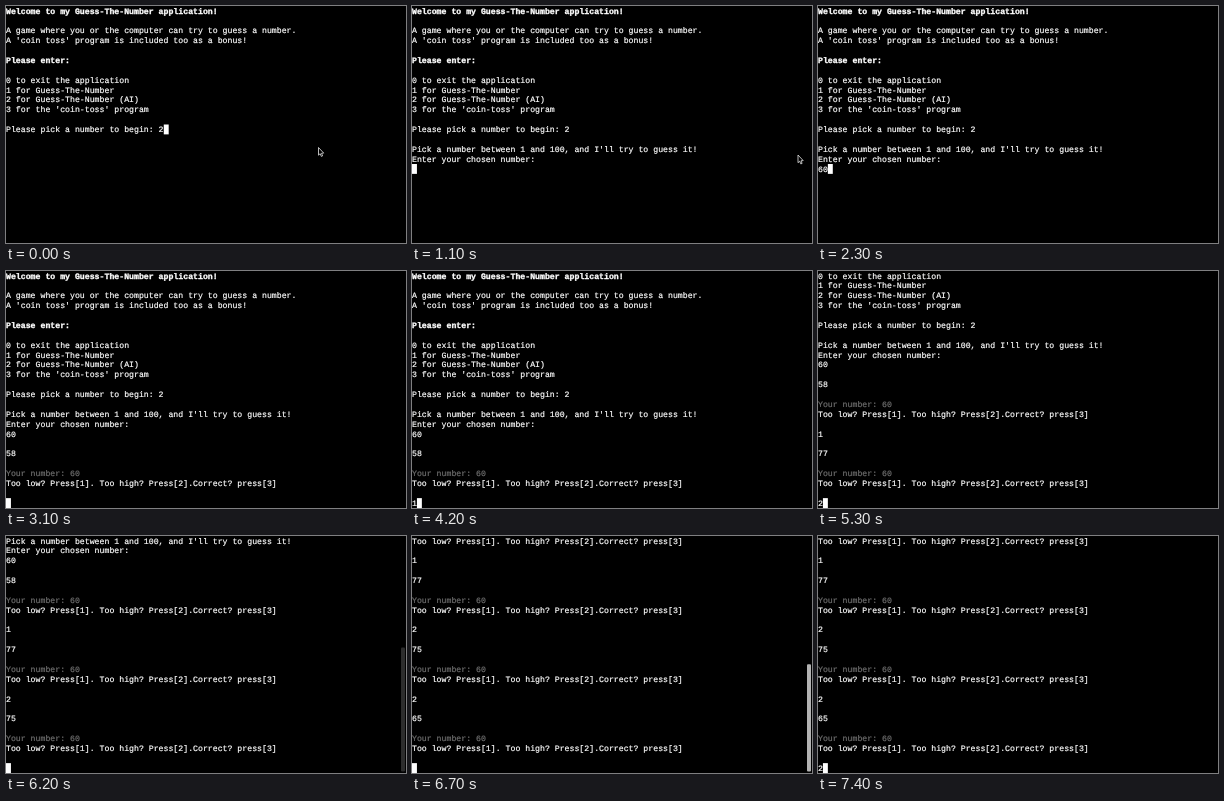
Animation of 400 by 237 pixels, one loop 8000 ms. Source, as an HTML page with a canvas:

```html
<!DOCTYPE html>
<html lang="en">
<head>
<meta charset="utf-8">
<title>Guess the number in a terminal</title>
<style>
  html, body { margin: 0; width: 100%; height: 100%; overflow: hidden; background: #000; }
  canvas { display: block; width: 400px; height: 237px; }
</style>
</head>
<body>
<canvas id="screen"></canvas>
<script>
const W = 400, H = 237, LOOP = 8000, TICK = 100;
const VISIBLE = 24, ROW = H / VISIBLE, COL = 4.93, BASELINE = 7.5;
const HISTORY = 7.5; // rows scrolled away before the session starts
const FONT = '8.215px "Liberation Mono", "Courier New", monospace';

const canvas = document.getElementById('screen');
const ctx = canvas.getContext('2d');
const dpr = window.devicePixelRatio || 1;
canvas.width = Math.round(W * dpr);
canvas.height = Math.round(H * dpr);

const clamp = v => Math.min(1, Math.max(0, v));
const mix = (a, b, p) => a + (b - a) * p;

// The session is recorded as lines plus the text cursor's place over time.
const lines = [{ text: '' }];
const moves = [];

function mark(time) {
  const row = lines.length - 1;
  moves.push({ time, row, col: lines[row].text.length });
}

function type(time, keys) {
  lines[lines.length - 1].text += keys;
  mark(time);
}

function print(time, text) {
  for (const line of text.split('\n')) {
    const [, tag, body] = line.match(/^([*~]?)(.*)$/);
    const last = lines[lines.length - 1];
    last.text += body;
    last.bold = tag === '*';
    last.dim = tag === '~';
    lines.push({ text: '' });
  }
  lines.pop();
  mark(time);
}

function playRound(guess, reply, shown, typed) {
  print(shown, `\n\n${guess}\n\n~Your number: 60\n` +
    'Too low? Press[1]. Too high? Press[2].Correct? press[3]\n\n');
  type(typed, reply);
}

print(0, `*Welcome to my Guess-The-Number application!

A game where you or the computer can try to guess a number.
A 'coin toss' program is included too as a bonus!

*Please enter:

0 to exit the application
1 for Guess-The-Number
2 for Guess-The-Number (AI)
3 for the 'coin-toss' program

Please pick a number to begin: `);
type(0, '2');
print(500, '\n');
print(600, "\nPick a number between 1 and 100, and I'll try to guess it!\n" +
  'Enter your chosen number:\n');
type(2300, '60');
playRound('58', '1', 3100, 4200);
['77', '75', '65'].forEach((guess, i) => {
  const shown = 4500 + 1100 * i;
  playRound(guess, '2', shown, shown + 700);
});

function drawLine({ bold, dim }, text, y) {
  ctx.font = (bold ? 'bold ' : '') + FONT;
  ctx.fillStyle = ctx.strokeStyle = dim ? '#6e6e6e' : '#fff';
  ctx.lineWidth = bold ? 0.35 : 0.2;
  ctx.fillText(text, 0, y);
  ctx.strokeText(text, 0, y);
}

function drawText(row, col) {
  const top = Math.max(0, row - VISIBLE + 1);
  ctx.textRendering = 'geometricPrecision';
  for (let i = top; i <= row; i++) {
    const text = i === row ? lines[i].text.slice(0, col) : lines[i].text;
    drawLine(lines[i], text, Math.round((i - top) * ROW + BASELINE));
  }
  ctx.fillStyle = '#fff';
  ctx.fillRect(col * COL, (row - top) * ROW, COL, ROW);
}

function drawScrollbar(t, row) {
  if (row < VISIBLE) return;
  const shown = moves.find(move => move.row === row).time;
  const age = Math.floor((t - shown) / TICK) * TICK;
  const alpha = 0.7 * clamp((700 - age) / 400);
  const height = H * VISIBLE / (row + 1 + HISTORY);
  ctx.fillStyle = `rgba(255, 255, 255, ${alpha})`;
  ctx.beginPath();
  ctx.roundRect(395, H - height - 0.5, 4, height - 1, 1);
  ctx.fill();
}

function pointerAt(t) {
  if (t < 500) {
    const p = t < TICK ? 0 : 1;
    return [mix(312, 323, p), mix(141, 145, p)];
  }
  if (t >= 900 && t < 2000) {
    const p = clamp(Math.floor((t - 900) / TICK) / 2);
    return [mix(373, 385.5, p), mix(142, 148.5, p)];
  }
  return null;
}

function drawPointer(t) {
  const place = pointerAt(t);
  if (!place) return;
  ctx.save();
  ctx.translate(...place);
  const arrow = new Path2D('M.5 .5V8.2L2.2 6.7 3.3 9.4 4.6 8.9 3.5 6.3 5.7 6.1Z');
  ctx.fillStyle = '#000';
  ctx.strokeStyle = '#e8e8e8';
  ctx.lineWidth = 0.8;
  ctx.fill(arrow);
  ctx.stroke(arrow);
  ctx.restore();
}

function draw(t) {
  const { row, col } = moves.filter(move => move.time <= t).pop();
  ctx.setTransform(canvas.width / W, 0, 0, canvas.height / H, 0, 0);
  ctx.fillStyle = '#000';
  ctx.fillRect(0, 0, W, H);
  drawText(row, col);
  drawScrollbar(t, row);
  drawPointer(t);
}

const start = performance.now();
function tick() {
  draw((performance.now() - start) % LOOP);
  requestAnimationFrame(tick);
}
tick();
</script>
</body>
</html>
```
